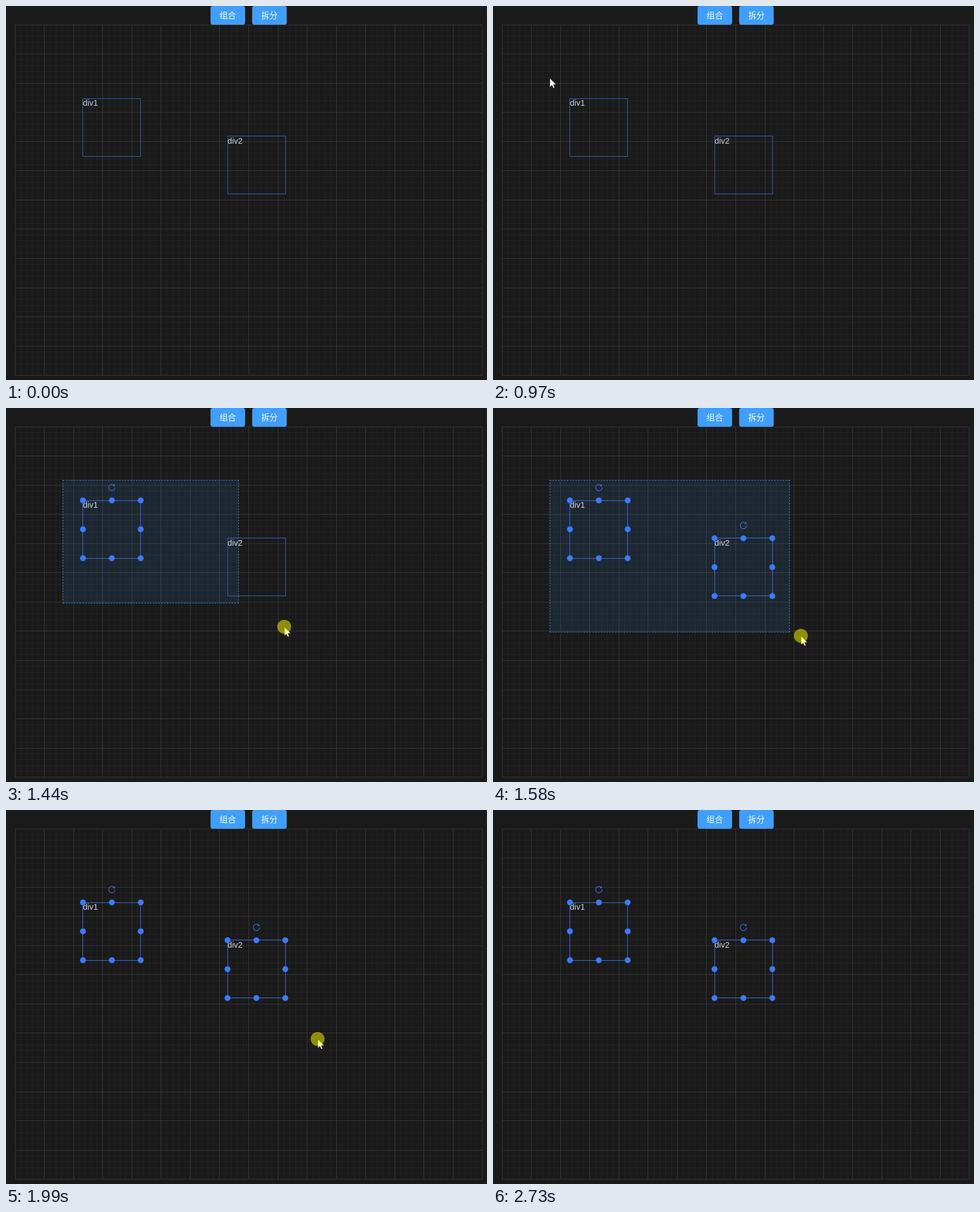
These frames come from a looping animation (849 by 660 pixels, 3060 ms). An HTML page with a canvas:

```html
<!DOCTYPE html>
<html lang="zh">
<head>
<meta charset="utf-8">
<title>Group selection</title>
<style>
html, body { margin: 0; width: 100%; height: 100%; overflow: hidden; background: #1a1a1a; }
#stage { position: relative; width: 849px; height: 660px; overflow: hidden; }
#stage > canvas, #stage > svg { position: absolute; left: 0; top: 0; }
#marquee {
  position: absolute; box-sizing: border-box; background-clip: padding-box;
  border: 1px dashed rgba(64, 158, 255, .8); background-color: rgba(64, 158, 255, .1);
}
.btn rect { fill: #409eff; }
.btn text {
  font: 14.4px "Noto Sans CJK SC", "Noto Sans CJK", sans-serif;
  fill: #fff; text-anchor: middle;
}
.box text { font: 14.4px "Liberation Sans", Arial, sans-serif; fill: #cfd3dc; }
.frame { fill: none; stroke: #3462cc; shape-rendering: crispEdges; }
.picked .frame { stroke: #3a72ee; }
.grips { display: none; }
.picked .grips { display: inline; }
</style>
</head>
<body>
<div id="stage">
  <canvas id="grid" width="849" height="660"></canvas>
  <div id="marquee"></div>
  <svg id="art" width="849" height="660">
    <defs>
      <g id="rotate" fill="none" stroke="#3a7afe" stroke-width="66" stroke-linejoin="round">
        <path d="M877 513A352 352 0 1 1 784 275"/>
        <path stroke-linecap="round" d="M816 180V329H667"/>
      </g>
      <path id="arm" d="M-1.5 0V-6.5H-4.6L0-11.4 4.6-6.5H1.5V0z"/>
    </defs>
    <g id="pointer">
      <path id="arrow" fill="#fff" stroke="#111" stroke-width=".6" d="M.4.6V16.2L4 12.8 6.3 18 8.9 16.9 6.6 11.8H11.6z"/>
      <g id="move" fill="#fff">
        <use href="#arm"/><use href="#arm" transform="rotate(90)"/>
        <use href="#arm" transform="rotate(180)"/><use href="#arm" transform="rotate(270)"/>
      </g>
      <circle id="press" r="12.3" fill="#ff0" fill-opacity=".5"/>
    </g>
  </svg>
</div>
<script>
const LOOP = 3060, TICK = 70, LAG = 50;
const ENTER = 130, PRESS = 1180, DRAG = 1250, RELEASE = 1990, LIFT = 2050, GONE = 2730;
const origin = { x: 16, y: 33 }, anchor = { x: 100, y: 127 };
const BOX = 102;
const $ = id => document.getElementById(id);

// key points of the pointer; power shapes the slow-down towards the next one
const path = [
  { t: ENTER, x: 759, y: 648, power: 2 },
  { t: 550, x: 145.5, y: 193.5, power: 2 },
  { t: 970, ...anchor },
  { t: PRESS, ...anchor },
  { t: DRAG, x: 127, y: 159 },
  { t: 1300, x: 295, y: 285, power: 1.3 },
  { t: 1440, x: 491, y: 386, power: 2 },
  { t: 1650, x: 550, y: 404 },
  { t: LIFT, x: 550, y: 404, power: 1.6 },
  { t: 2450, x: 792, y: 639, power: 1.5 },
  { t: 2660, x: 800, y: 649 }
];

function pointAt(t) {
  const i = Math.max(0, path.findLastIndex(p => p.t <= t));
  const a = path[i], b = path[i + 1];
  if (!b) return a;
  const tick = Math.max(0, Math.floor((t - a.t) / TICK) * TICK);
  const k = 1 - (1 - tick / (b.t - a.t)) ** (a.power || 1);
  return { x: a.x + (b.x - a.x) * k, y: a.y + (b.y - a.y) * k };
}

function drawGrid() {
  const ctx = $("grid").getContext("2d");
  const unit = 10.3125, cols = 80, rows = 60;
  const lines = (gap, color) => {
    ctx.fillStyle = color;
    for (let i = 0; i <= cols; i += gap)
      ctx.fillRect(Math.min(840, Math.floor(origin.x + i * unit)), origin.y, 1, rows * unit);
    for (let i = 0; i <= rows; i += gap)
      ctx.fillRect(origin.x, Math.floor(origin.y + i * unit), cols * unit, 1);
  };
  lines(1, "#222");
  lines(5, "#383838");
}

function addGroup(name, html) {
  const g = document.createElementNS("http://www.w3.org/2000/svg", "g");
  g.setAttribute("class", name);
  g.innerHTML = html;
  $("art").insertBefore(g, $("pointer"));
  return g;
}

function addButton(label, x) {
  addGroup("btn", `<rect x="${x}" width="61" height="33" rx="4"/>
    <text x="${x + 30.5}" y="22.2">${label}</text>`);
}

function addBox(label, x, y) {
  let grips = "";
  for (let i = 0; i < 9; i++) {
    if (i === 4) continue;
    const col = i % 3, row = Math.floor(i / 3);
    grips += `<circle cx="${x + .4 + BOX / 2 * col}" cy="${y + .4 + BOX / 2 * row}" r="5.2"/>`;
  }
  const el = addGroup("box", `<text x="${x + .4}" y="${Math.round(y + 13.5)}">${label}</text>
    <rect class="frame" x="${Math.round(x) + .5}" y="${Math.round(y) + .5}" width="${BOX}" height="${BOX}"/>
    <g class="grips" fill="#3a7afe">${grips}
      <use href="#rotate" transform="translate(${x + 51.5} ${y - 22.2}) scale(.0161) translate(-524 -513)"/></g>`);
  return { el, right: x + BOX, bottom: y + BOX };
}

drawGrid();
addButton("组合", 361);
addButton("拆分", 434.5);
const boxes = [addBox("div1", 135.4, 162.6), addBox("div2", 390.6, 229.4)];

const show = (el, on) => el.style.display = on ? "" : "none";

function render(t) {
  const within = (a, b) => t >= a && t < b;
  const { x, y } = pointAt(t);
  const moving = within(480, 620);
  $("pointer").setAttribute("transform", `translate(${x} ${y})`);
  show($("pointer"), within(ENTER, GONE));
  show($("move"), moving);
  show($("arrow"), !moving);
  show($("press"), within(PRESS, LIFT));

  // the marquee trails the pointer and starts as a dot in the canvas corner
  const dragged = t >= DRAG;
  const corner = dragged ? pointAt(Math.min(t, RELEASE) - LAG) : origin;
  const from = dragged ? anchor : origin;
  Object.assign($("marquee").style, {
    left: from.x + "px",
    top: from.y + "px",
    width: Math.max(2, Math.round(corner.x - from.x)) + "px",
    height: Math.max(2, Math.round(corner.y - from.y)) + "px"
  });
  show($("marquee"), within(PRESS, RELEASE));

  for (const box of boxes)
    box.el.classList.toggle("picked", dragged && corner.x > box.right && corner.y > box.bottom);
}

const start = performance.now();
function tick() {
  render((performance.now() - start) % LOOP);
  requestAnimationFrame(tick);
}
tick();
</script>
</body>
</html>
```
